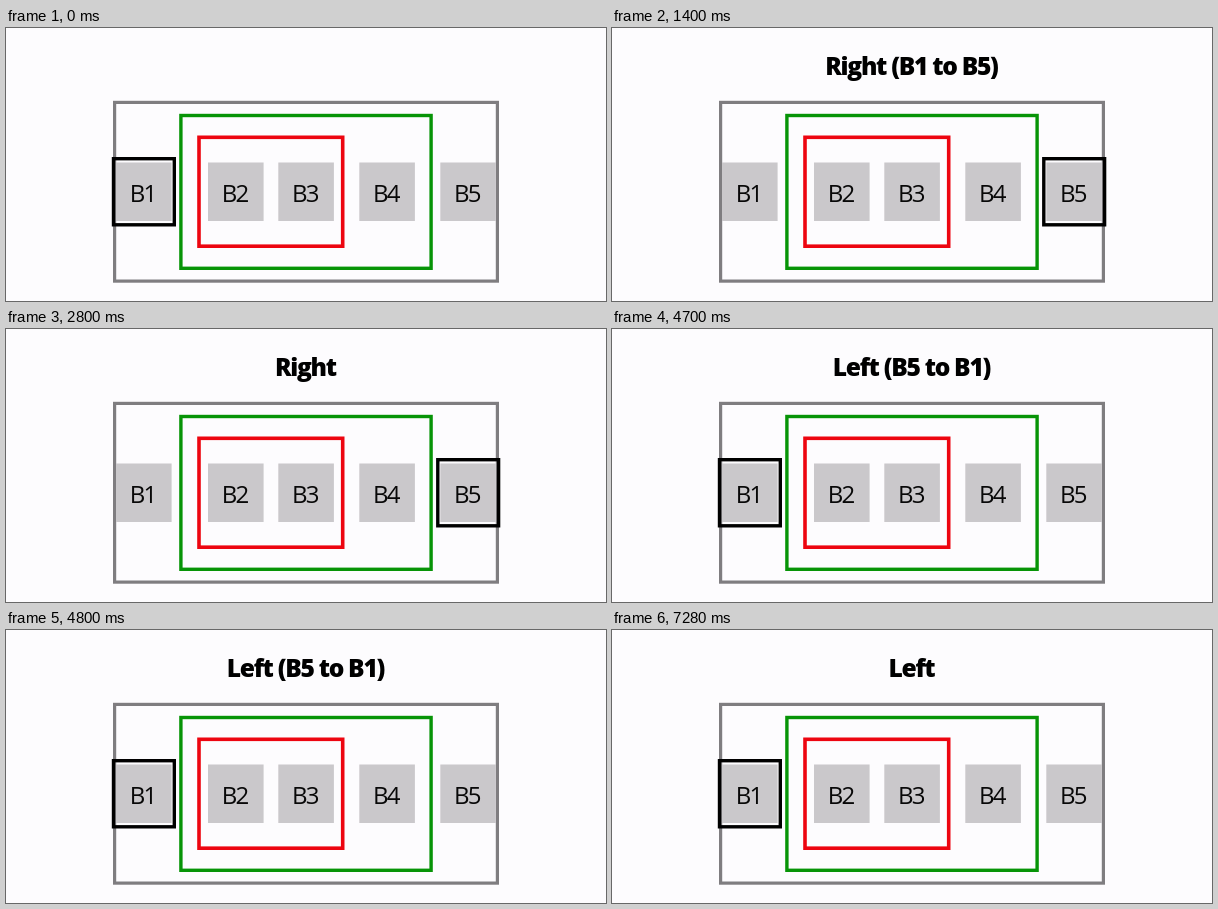
Animation of 600x273 px, one loop 8 s. Source, as an HTML page:

```html
<!DOCTYPE html>
<html lang="en">
<head>
<meta charset="utf-8">
<title>Focus navigation</title>
<style>
  html, body { margin: 0; width: 100%; height: 100%; overflow: hidden; background: #fdfcfe; }
  svg { display: block; width: 100%; height: 100%; }
  text { font-family: "Open Sans", "Noto Sans", sans-serif; text-anchor: middle; }
  .label { font-size: 24px; letter-spacing: -1.8px; fill: #080808; }
  .title { font-size: 24.6px; font-weight: 800; letter-spacing: -1.3px; fill: #000; }
</style>
</head>
<body>
<svg id="stage" viewBox="0 0 600 273"></svg>
<script>
const LOOP = 8000;
const steps = [
  { at: 0, title: "", focus: 0 },
  { at: 1400, title: "Right (B1 to B5)", focus: 4 },
  { at: 2800, title: "Right", focus: 4 },
  { at: 4700, title: "Left (B5 to B1)", focus: 0 },
  { at: 6200, title: "Left", focus: 0 }
];
const buttonX = [110, 202, 272.3, 353.3, 434.3];
const stage = document.getElementById("stage");

function add(tag, attrs, text = "") {
  const el = document.createElementNS("http://www.w3.org/2000/svg", tag);
  for (const key in attrs) el.setAttribute(key, attrs[key]);
  el.textContent = text;
  return stage.appendChild(el);
}

// Border drawn inside the given outer edges.
function border(left, top, right, bottom, color, weight) {
  return add("rect", {
    x: left + weight / 2, y: top + weight / 2,
    width: right - left - weight, height: bottom - top - weight,
    fill: "none", stroke: color, "stroke-width": weight
  });
}

border(107, 72.8, 493, 254.7, "#7f7d80", 3.2);
border(173.2, 85.8, 426.8, 242, "#079407", 3.4);
border(191.2, 107.5, 338.5, 220, "#ed0510", 3.6);
buttonX.forEach((x, i) => {
  add("rect", { x, y: 134.5, width: 55.6, height: 58.5, fill: "#cac8cb" });
  add("text", { x: x + 26.5, y: 174, class: "label" }, "B" + (i + 1));
});
const ring = border(105.8, 129, 170, 198.5, "#000", 3.4);
const title = add("text", { x: 299.4, y: 46.8, class: "title" });

let shown;
function draw(time) {
  const step = steps.findLast(s => s.at <= time % LOOP);
  if (step !== shown) {
    shown = step;
    title.textContent = step.title;
    ring.setAttribute("transform", `translate(${buttonX[step.focus] - buttonX[0]} 0)`);
  }
}

const start = performance.now();
function tick() {
  draw(performance.now() - start);
  requestAnimationFrame(tick);
}
tick();
</script>
</body>
</html>
```
